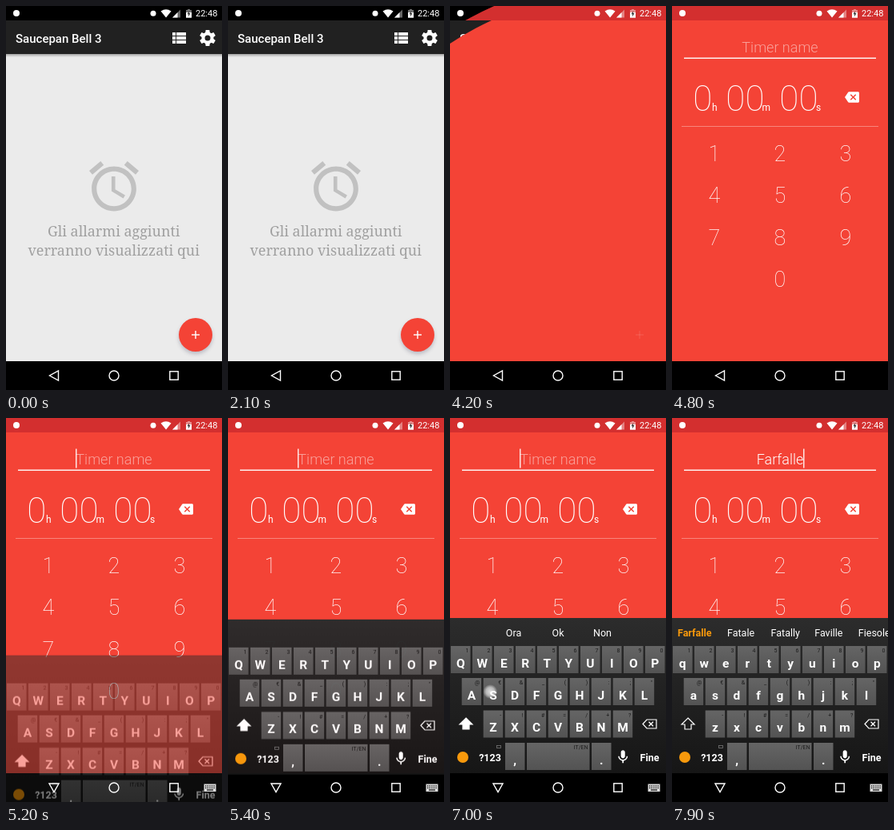
These frames come from a looping animation (270 px wide and 480 px high, 8 s). An HTML page with a canvas:

```html
<!DOCTYPE html>
<html lang="it">
<head>
<meta charset="utf-8">
<title>Timer</title>
<style>
  html, body { margin: 0; width: 100%; height: 100%; overflow: hidden; background: #000; }
  canvas { display: block; width: 100vw; height: 100vh; }
</style>
</head>
<body>
<canvas id="stage"></canvas>
<script>
const W = 270, H = 480, LOOP = 8000;
const BAR = 18, TOOLBAR = 60, NAV = 444;
const RED = '#f44336', DARK_RED = '#d32f2f', ORANGE = '#f7990c';
const FAB = { x: 237, y: 411, r: 21 };
const REVEAL = { start: 3970, time: 284, r: 474 };
const FADE_IN = 4300, KB_IN = 5100, PRESS = 6040, RELEASE = 7450;

const ICON = {
  alarm: 'M22 5.72l-4.6-3.86-1.29 1.53 4.6 3.86L22 5.72zM7.88 3.39L6.6 1.86 2 5.71l1.29 1.53 4.59-3.85zM12.5 8H11v6l4.75 2.85.75-1.23-4-2.37V8zM12 4c-4.97 0-9 4.03-9 9s4.02 9 9 9c4.97 0 9-4.03 9-9s-4.03-9-9-9zm0 16c-3.87 0-7-3.13-7-7s3.13-7 7-7 7 3.13 7 7-3.13 7-7 7z',
  erase: 'M22 3H7c-.69 0-1.23.35-1.59.88L0 12l5.41 8.11c.36.53.9.89 1.59.89h15c1.1 0 2-.9 2-2V5c0-1.1-.9-2-2-2zm-3 12.59L17.59 17 14 13.41 10.41 17 9 15.59 12.59 12 9 8.41 10.41 7 14 10.59 17.59 7 19 8.41 15.41 12 19 15.59z',
  mic: 'M12 14c1.66 0 3-1.34 3-3V5c0-1.66-1.34-3-3-3S9 3.34 9 5v6c0 1.66 1.34 3 3 3zm5.3-3c0 3-2.54 5.1-5.3 5.1S6.7 14 6.7 11H5c0 3.41 2.72 6.23 6 6.72V21h2v-3.28c3.28-.48 6-3.3 6-6.72h-1.7z'
};

const canvas = document.getElementById('stage');
const layer = document.createElement('canvas');
const dpr = window.devicePixelRatio || 1;
for (const c of [canvas, layer]) {
  c.width = W * dpr;
  c.height = H * dpr;
}
const main = canvas.getContext('2d'), kb = layer.getContext('2d');
main.scale(dpr, dpr);
kb.scale(dpr, dpr);
let g = main;

const clamp = v => Math.max(0, Math.min(1, v));
const smooth = u => u * u * (3 - 2 * u);
const white = a => `rgba(255,255,255,${a})`;

function rect(x, y, w, h, fill) {
  g.fillStyle = fill;
  g.fillRect(x, y, w, h);
}
function disc(x, y, r, fill) {
  g.beginPath();
  g.arc(x, y, r, 0, 7);
  g.fillStyle = fill;
  g.fill();
}
function poly(points, fill, stroke, width = 1.4) {
  g.beginPath();
  points.forEach(([x, y]) => g.lineTo(x, y));
  g.closePath();
  if (fill) { g.fillStyle = fill; g.fill(); }
  if (stroke) { g.strokeStyle = stroke; g.lineWidth = width; g.stroke(); }
}
function line(x1, y1, x2, y2, color, width) {
  g.beginPath();
  g.moveTo(x1, y1);
  g.lineTo(x2, y2);
  g.strokeStyle = color;
  g.lineWidth = width;
  g.stroke();
}
function text(str, x, y, size, weight = 400, fill = '#fff', align = 'left', family = 'Roboto, sans-serif') {
  g.font = `${weight} ${size}px ${family}`;
  g.textAlign = align;
  g.fillStyle = fill;
  g.fillText(str, x, y);
}
function icon(name, x, y, scale, fill) {
  g.save();
  g.translate(x, y);
  g.scale(scale, scale);
  g.fillStyle = fill;
  g.fill(new Path2D(ICON[name]));
  g.restore();
}
function vertical(y1, y2, c1, c2) {
  const grad = g.createLinearGradient(0, y1, 0, y2);
  grad.addColorStop(0, c1);
  grad.addColorStop(1, c2);
  return grad;
}

function gear(x, y) {
  g.save();
  g.translate(x, y);
  for (let i = 0; i < 6; i++) {
    g.rotate(Math.PI / 3);
    poly([[-3, -6], [-2.3, -10], [2.3, -10], [3, -6]], '#fff');
  }
  disc(0, 0, 7.5, '#fff');
  disc(0, 0, 3.5, '#212121');
  g.restore();
}

function plus(alpha) {
  rect(FAB.x - 5, FAB.y - 0.7, 10, 1.4, white(alpha));
  rect(FAB.x - 0.7, FAB.y - 5, 1.4, 10, white(alpha));
}

function home(t) {
  const paper = t < 3300 ? '#ebebeb' : '#edebed';
  rect(0, 0, W, H, paper);
  rect(0, TOOLBAR, W, 4, vertical(TOOLBAR, TOOLBAR + 4, '#a4a4a4', paper));
  rect(0, 0, W, BAR, '#000');
  rect(0, BAR, W, TOOLBAR - BAR, '#212121');
  text('Saucepan Bell 3', 12, 46, 15, 500);
  for (let y = 33; y < 47; y += 5) {
    rect(208, y, 4, 4, '#fff');
    rect(213, y, 12, 4, '#fff');
  }
  gear(252, 40);
  icon('alarm', 97.8, 188.2, 3.1, '#c1c1c1');
  const serif = '"Roboto Slab", "Noto Serif", serif';
  text('Gli allarmi aggiunti', 134.7, 288, 17.9, 400, '#a0a0a0', 'center', serif);
  text('verranno visualizzati qui', 134.7, 311.5, 17.9, 400, '#a0a0a0', 'center', serif);
  g.save();
  g.shadowColor = 'rgba(60,60,90,.28)';
  g.shadowBlur = 5 * dpr;
  g.shadowOffsetY = 3 * dpr;
  disc(FAB.x, FAB.y, FAB.r, RED);
  g.restore();
}

function reveal(t) {
  const u = clamp((t - REVEAL.start) / REVEAL.time);
  if (!u) return;
  const r = REVEAL.r * (1 - Math.cos(Math.PI * u)) / 2;
  const zone = (y, h, radius, color) => {
    g.save();
    g.beginPath();
    g.rect(0, y, W, h);
    g.clip();
    disc(FAB.x, FAB.y, radius, color);
    g.restore();
  };
  zone(BAR, NAV - BAR, r, RED);
  zone(0, BAR, r + 15, DARK_RED);
}

function statusIcons() {
  disc(13, 9, 4, '#fff');
  disc(184, 9.3, 3.5, '#fff');
  g.beginPath();
  g.moveTo(200, 14.5);
  g.lineTo(193.5, 6.5);
  g.quadraticCurveTo(200, 2, 206.5, 6.5);
  g.fillStyle = '#fff';
  g.fill();
  poly([[208, 14.5], [218, 14.5], [218, 4.5]], white(0.4));
  poly([[208, 14.5], [214.5, 14.5], [214.5, 8]], '#fff');
  rect(225, 5, 7, 3, white(0.45));
  rect(225, 8, 7, 6.7, '#fff');
  rect(227, 4, 3, 1, white(0.45));
  poly([[229.2, 6], [226.5, 10.3], [228.2, 10.3], [227.8, 13.5], [230.5, 9], [228.8, 9]], '#333');
  text('22:48', 264.4, 13.3, 11, 400, '#fff', 'right');
}

function timerScreen(t) {
  const alpha = clamp((t - FADE_IN) / 300);
  if (!alpha) return;
  const typed = t >= RELEASE;
  const name = typed ? 'Farfalle' : 'Timer name';
  g.save();
  g.globalAlpha = alpha;
  text(name, 135, 57.5, 18, 300, typed ? '#fff' : white(0.5), 'center');
  const caretX = 135 + g.measureText(name).width / 2 * (typed ? 1 : -1);
  const blink = typed ? t - RELEASE : t;
  if (blink % 1000 < 500) rect(caretX - 0.2, 38.5, 1.3, 24, '#fff');
  rect(15, 64.5, 240, 1.4, '#fff');

  text('0', 26.3, 131, 44, 100);
  text('00', 67.3, 131, 44, 100);
  text('00', 134.3, 131, 44, 100);
  text('h', 50, 131, 12);
  text('m', 112.5, 131, 12);
  text('s', 180, 131, 12);
  icon('erase', 216, 105, 0.75, '#fff');
  rect(12, 150, 246, 1, white(0.35));

  for (let n = 1; n <= 9; n++) {
    const col = (n - 1) % 3, row = Math.floor((n - 1) / 3);
    text(n, 53 + col * 82, 194 + row * 52.4, 27, 100, '#fff', 'center');
  }
  text('0', 135, 351.2, 27, 100, '#fff', 'center');
  g.restore();
}

function key(x, y, w, label, hint, lit) {
  rect(x, y, w, 34, lit ? ORANGE : vertical(y, y + 34, '#656565', '#535353'));
  text(label, x + w / 2, y + 26.5, 15.5, 700, '#fff', 'center');
  text(hint, x + w - 2, y + 8, 7, 400, lit ? '#fff' : '#1c1c1c', 'right');
}

function keyRow(letters, hints, x, y, upper, held) {
  [...letters].forEach((c, i) =>
    key(x + i * 27, y, 24.5, upper ? c.toUpperCase() : c, hints[i], c === held));
}

function suggestions(t) {
  if (t < 5500) return;
  if (t < RELEASE) {
    ['Ora', 'Ok', 'Non'].forEach((s, i) => text(s, 79.5 + i * 55.5, 272.5, 12.5, 400, '#fff', 'center'));
    return;
  }
  text('Farfalle', 7, 272.5, 12.5, 700, ORANGE);
  ['Fatale', 'Fatally', 'Faville', 'Fiesole'].forEach((s, i) => text(s, 69 + i * 54.6, 272.5, 12.5));
}

function popup() {
  poly([[90, 264], [126, 264], [126, 317], [116, 327], [100, 327], [90, 317]],
    vertical(264, 327, '#ffad1c', '#e98a08'));
  poly([[90, 317], [126, 317], [116, 327], [100, 327]], '#c97706');
  text('F', 108, 301, 22, 700, '#fff', 'center');
}

function keyboard(t) {
  const upper = t < RELEASE;
  const held = t >= PRESS && t < 6300 ? 'f' : '';
  rect(0, 250, W, NAV - 250, vertical(250, NAV, '#2c2c2c', '#161616'));
  suggestions(t);
  keyRow('qwertyuiop', '1234567890', 1, 285, upper, held);
  keyRow('asdfghjkl', '@€&_():;"', 14.7, 325, upper, held);
  keyRow('zxcvbnm', '-!#=/+?', 41.7, 365.5, upper, held);

  poly([[20, 375], [28, 383], [24, 383], [24, 389], [16, 389], [16, 383], [12, 383]],
    upper ? '#fff' : null, '#fff', 1.2);
  poly([[241, 382.5], [246, 377], [258, 377], [258, 388], [246, 388]], null, '#fff', 1.2);
  line(248.5, 379.8, 254, 385.2, '#fff', 1.2);
  line(254, 379.8, 248.5, 385.2, '#fff', 1.2);

  disc(16, 424, 7, ORANGE);
  text('?123', 50, 428.5, 12.5, 700, '#fff', 'center');
  g.strokeStyle = '#777';
  g.lineWidth = 0.8;
  g.strokeRect(58.5, 409.5, 5, 3);
  key(69, 406, 24.5, ',', '');
  key(96, 406, 78.5, '', 'IT/EN');
  key(177, 406, 24.5, '.', '');
  icon('mic', 206, 413.5, 0.85, '#fff');
  text('Fine', 249.5, 428.5, 12.5, 700, '#fff', 'center');
  if (held) popup();
}

// Waypoints of the swipe: time, x, y
const SWIPE = [
  [6060, 108, 342], [6320, 27, 342], [6560, 94, 303], [6740, 108, 342],
  [6950, 27, 342], [7200, 243, 342], [RELEASE, 67, 304]
];

function finger(t) {
  if (t < 5980 || t >= RELEASE) return;
  const i = Math.max(1, SWIPE.findIndex(p => p[0] > t));
  const [a, b] = [SWIPE[i - 1], SWIPE[i]];
  const u = smooth(clamp((t - a[0]) / (b[0] - a[0])));
  const x = a[1] + (b[1] - a[1]) * u, y = a[2] + (b[2] - a[2]) * u;
  const glow = g.createRadialGradient(x, y, 0, x, y, 9);
  glow.addColorStop(0, white(0.8));
  glow.addColorStop(0.6, white(0.55));
  glow.addColorStop(1, white(0));
  disc(x, y, 9, glow);
}

function navIcons(open) {
  poly(open ? [[54, 457], [66, 457], [60, 467.5]] : [[65.5, 456], [65.5, 468], [54.5, 462]], null, '#fff');
  g.beginPath();
  g.arc(135, 462, 6, 0, 7);
  g.stroke();
  g.strokeRect(204.8, 456.8, 10.4, 10.4);
  if (!open) return;
  rect(247.5, 457.5, 15, 9.5, '#ddd');
  for (let i = 0; i < 5; i++) {
    rect(249 + i * 2.6, 459.2, 1.4, 1.4, '#111');
    rect(249 + i * 2.6, 461.7, 1.4, 1.4, '#111');
  }
  rect(251, 464.3, 8, 1.3, '#111');
}

function showKeyboard(t) {
  const u = clamp((t - KB_IN) / 350);
  if (!u) return;
  const ease = 1 - (1 - u) * (1 - u);
  g = kb;
  g.clearRect(0, 0, W, H);
  keyboard(t);
  g = main;
  g.globalAlpha = ease;
  g.drawImage(layer, 0, 92 * (1 - ease), W, H);
  g.globalAlpha = 1;
}

function frame(now) {
  const t = now % LOOP;
  if (t < REVEAL.start + REVEAL.time) {
    home(t);
    reveal(t);
    plus(clamp(1 - (t - 4000) / 225));
  } else {
    rect(0, 0, W, H, RED);
    rect(0, 0, W, BAR, DARK_RED);
    timerScreen(t);
  }
  statusIcons();
  rect(0, NAV, W, H - NAV, '#000');
  showKeyboard(t);
  navIcons(t >= KB_IN);
  finger(t);
  requestAnimationFrame(frame);
}
requestAnimationFrame(frame);
</script>
</body>
</html>
```
